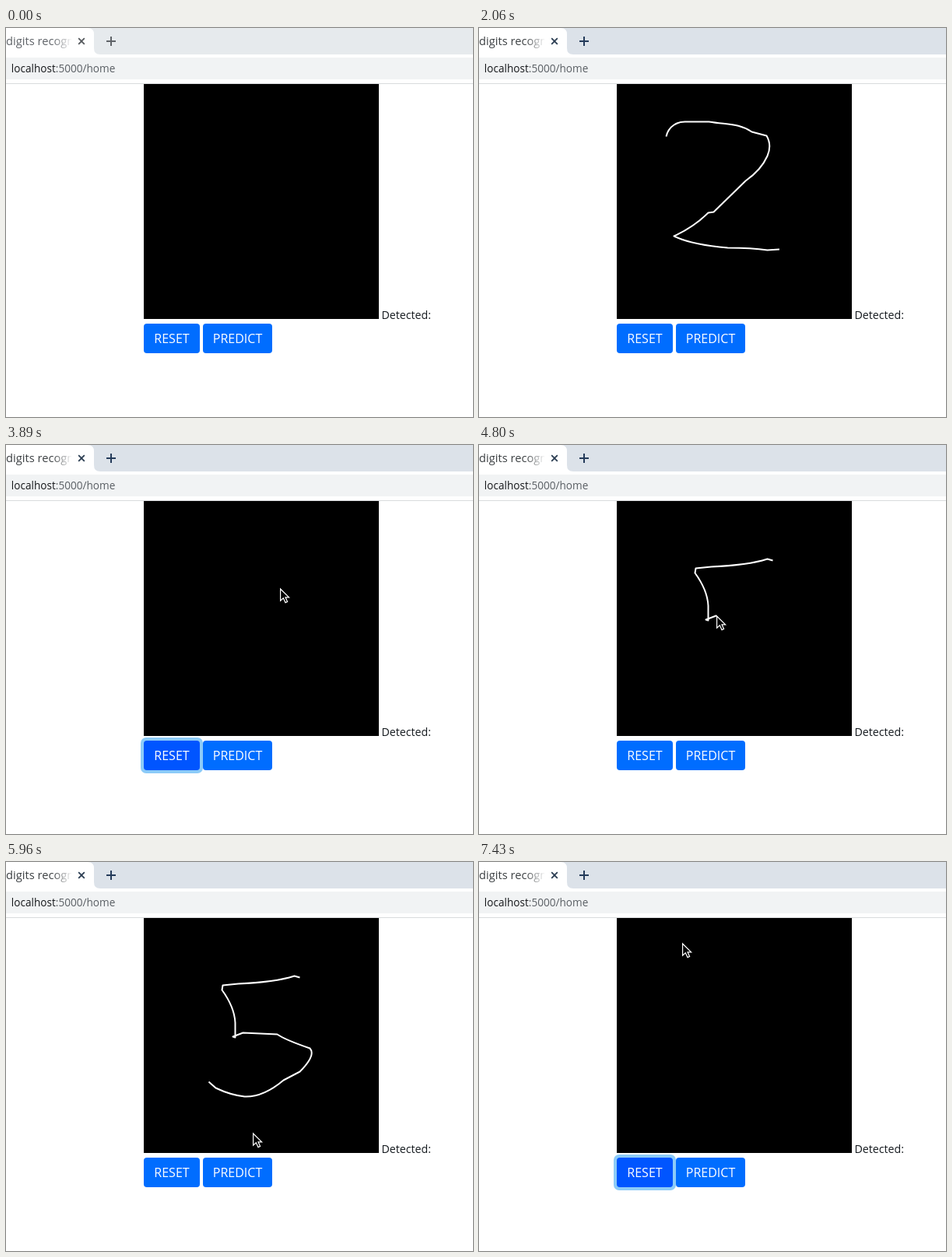
An HTML page for the animation above (7530 ms loop, 600 px wide and 500 px high).

```html
<!DOCTYPE html>
<html lang="en">
<head>
<meta charset="utf-8">
<title>Digit recognizer</title>
<style>
  html, body { margin: 0; width: 100%; height: 100%; overflow: hidden; background: #fff; }
  svg { display: block; width: 600px; height: 500px; font-family: "Open Sans", "Noto Sans", sans-serif; }
  .label { font-size: 16px; fill: #fff; text-anchor: middle; }
  .pen { fill: none; stroke: #fff; stroke-width: 2; stroke-linejoin: round; }
  .ring { fill: #8ccbf8; }
</style>
</head>
<body>
<svg viewBox="0 0 600 500">
  <defs>
    <linearGradient id="fade" gradientUnits="userSpaceOnUse" x1="60" x2="85" y1="0" y2="0">
      <stop offset="0" stop-color="#fff" stop-opacity="0"/>
      <stop offset="1" stop-color="#fff"/>
    </linearGradient>
  </defs>
  <rect width="600" height="500" fill="#fff"/>
  <rect id="strip" width="600" height="34"/>
  <path d="M0 34V0H105Q113 0 113 8V26Q113 34 121 34Z" fill="#fff"/>
  <text id="tab" x="0" y="22" font-size="14.7">digits recogn</text>
  <rect x="56" y="4" width="32" height="26" fill="url(#fade)"/>
  <path id="close" d="M93.2 13.2l7.6 7.6m0-7.6l-7.6 7.6" stroke-width="1.8"/>
  <path id="plus" d="M129 17h12m-6-6v12" stroke-width="2"/>
  <rect y="38" width="600" height="28" fill="#f1f3f4"/>
  <text x="6.8" y="57" font-size="13.6" fill="#15171a">localhost<tspan fill="#5a5f64">:5000/home</tspan></text>
  <rect y="71" width="600" height="1" fill="#d9dbdd"/>
  <rect x="177" y="72" width="302" height="302" fill="#000"/>
  <g transform="translate(.5 .5)">
    <path id="two" class="pen" d="M240 139C243 125 255 120 264 120H295C320 124 334 122 350 133L369 138Q376 150 370 164Q362 182 342 196L301 236 294 237Q276 255 250 267Q272 278 319 282Q350 282 370 285L386 284 390 283 386 281"/>
    <path id="five" class="pen" d="M377 148L370 146Q345 154 298 156L278 158 277 164Q293 186 294 206V225L291 224 304 219 348 221Q358 228 390 239Q398 248 377 269L356 280Q330 302 306 301Q288 299 269 290L260 282"/>
  </g>
  <text x="482.5" y="374" font-size="14.2" fill="#14191e">Detected:</text>
  <text id="digit" x="548.2" y="374" font-size="16" fill="#14191e"></text>
  <rect id="resetRing" class="ring" x="173" y="376" width="80" height="46" rx="7"/>
  <rect id="predictRing" class="ring" x="249" y="376" width="97" height="46" rx="7"/>
  <rect id="reset" x="177" y="380" width="72" height="38" rx="4"/>
  <rect id="predict" x="253" y="380" width="89" height="38" rx="4"/>
  <text class="label" x="213" y="405">RESET</text>
  <text class="label" x="297.5" y="405">PREDICT</text>
  <path id="arrow" d="M.6 1V16.2L4.3 12.8 7 18.6 9.6 17.4 7 11.8H11.6Z" fill="#000" stroke="#fff" stroke-width="1.2"/>
  <path id="hand" d="M-1.6 9.5V1.2a1.5 1.5 0 0 1 3 0V6q1.8-1 2.8.4 1.8-.8 2.6.6 2-.4 2 1.6V12q0 2-1.4 3.4V17.3H-.6V15.8L-5 10.6q-1-1.8.4-2.2 1.4-.2 3 2.2ZM1.4 6v3M4.2 6.5v2.5M6.8 7.2v2" fill="#fff" stroke="#111"/>
</svg>
<script>
const LOOP = 7530;
const FADE = 150;
const el = id => document.getElementById(id);
const set = (id, name, value) => el(id).setAttribute(name, value);
const show = (id, on) => set(id, 'visibility', on ? 'visible' : 'hidden');
const within = (t, from, to) => t >= from && t < to;
const mix = (a, b, k) => a + (b - a) * k;
const ramp = (t, from, to) => Math.min(1, Math.max(0, (t - from) / (to - from)));
const smooth = k => k * k * (3 - 2 * k);

// fades in after one time and out after another
const pulse = (t, on, off) => ramp(t, on, on + FADE) - ramp(t, off, off + FADE);

// hover, click and blur times of each visit to a button
const visits = {
  reset: [[3080, 3280, 4050], [6960, 7110, LOOP]],
  predict: [[2480, 2580, 3280], [6160, 6420, 7110]]
};

// start, end and destination of each pointer move
const moves = [
  [2900, 3230, 224, 404], [3480, 4020, 374, 147], [5790, 5960, 317, 348],
  [5960, 6300, 308, 399], [6820, 7110, 222, 402], [7230, 7430, 261, 104]
];

function pointOn(id, part) {
  const path = el(id);
  const { x, y } = path.getPointAtLength(path.getTotalLength() * part);
  return [x, y];
}

function stroke(id, part, on) {
  const length = el(id).getTotalLength();
  set(id, 'stroke-dasharray', `${length * part} ${length + 1}`);
  show(id, on && part > 0);
}

function button(id, t) {
  let dark = 0, focus = 0;
  for (const [hover, click, blur] of visits[id]) {
    dark += pulse(t, hover, blur);
    focus += pulse(t, click, blur);
  }
  set(id, 'fill', `rgb(0,${Math.round(mix(109, 85, dark))},255)`);
  set(id + 'Ring', 'opacity', focus);
}

function pointer(t, part) {
  if (part > .02 && t < 5790) return pointOn('five', part);
  let pos = t < 5790 ? [300, 402] : pointOn('five', 1);
  for (const [start, end, x, y] of moves) {
    if (t < start || (t >= 5790 && end < 5790)) continue;
    const k = smooth(ramp(t, start, end));
    pos = [mix(pos[0], x, k), mix(pos[1], y, k)];
  }
  return pos;
}

function cursor(t, part) {
  const [x, y] = pointer(t, part).map(Math.round);
  const over = within(y, 380, 418) && (within(x, 177, 249) || within(x, 253, 342));
  show('hand', t >= 2480 && over);
  show('arrow', t >= 2480 && !over);
  set(over ? 'hand' : 'arrow', 'transform', `translate(${x} ${y})`);
}

function draw(t) {
  const active = t >= 540;
  set('strip', 'fill', active ? '#dce2e9' : '#e6eaed');
  set('tab', 'fill', active ? '#3c4043' : '#5f6368');
  set('close', 'stroke', active ? '#2b3d52' : '#55595d');
  set('plus', 'stroke', active ? '#243b5a' : '#5f6368');

  const two = .49 * ramp(t, 580, 1280) + .49 * ramp(t, 1280, 2060) + .02 * ramp(t, 2110, 2250);
  const five = .425 * ramp(t, 4050, 4800) + .5 * ramp(t, 4800, 5570) + .075 * ramp(t, 5570, 5790);
  stroke('two', two, t < 3390);
  stroke('five', five, t < 7230);
  el('digit').textContent = within(t, 2850, 3390) ? '2' : within(t, 6640, 7230) ? '5' : '';
  button('reset', t);
  button('predict', t);
  cursor(t, five);
}

const begin = performance.now();
function tick() {
  draw((performance.now() - begin) % LOOP);
  requestAnimationFrame(tick);
}
tick();
</script>
</body>
</html>
```
